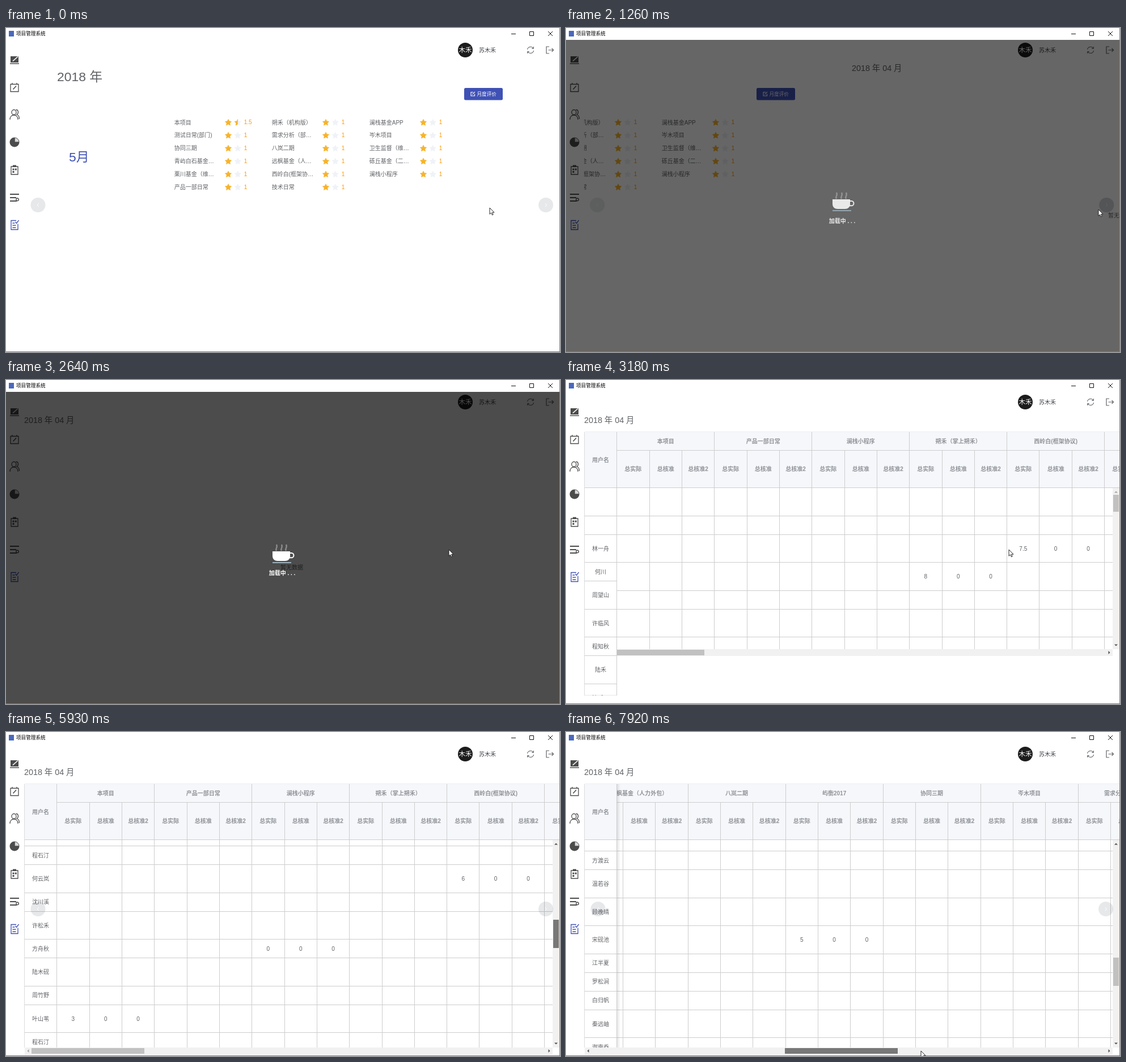
An HTML page with a canvas for the animation above (8000 ms loop, 977x573 px).

```html
<!DOCTYPE html>
<html lang="zh-CN">
<head>
<meta charset="utf-8">
<title>项目管理系统</title>
<style>
html, body { margin: 0; width: 100%; height: 100%; overflow: hidden; background: #fff; }
canvas { display: block; }
</style>
</head>
<body>
<canvas id="stage" width="977" height="573"></canvas>
<script>
const ctx = document.getElementById('stage').getContext('2d');
const FONT = '"Liberation Sans", "Noto Sans CJK SC", "Noto Sans CJK", sans-serif';
const LOOP = 8000, BASE = 10.03;
const BLUE = '#3f51b5', INK = '#606266', DIM = '#909399', ICON = '#4c4c4c', GOLD = '#f7b32a', SCORE = '#ff9900', LINE = '#cdcdcd';

// Screen updates come in bursts: [first, last, count]
const updates = [0].concat([
  [70, 460, 6], [680, 770, 2], [1010, 1260, 4], [1340, 1800, 7], [2180, 2410, 4], [2580, 2640, 2],
  [3180, 3250, 2], [3720, 3950, 4], [4190, 4190, 1], [4430, 4510, 2], [4810, 5150, 5], [5300, 5450, 2],
  [5680, 5930, 4], [6080, 6080, 1], [6230, 6610, 6], [6910, 7680, 11], [7770, 7920, 3]
].flatMap(([a, b, n]) => Array.from({ length: n }, (_, i) => n > 1 ? a + (b - a) * i / (n - 1) : a)));

// Tracks: [time, value, ...]
const pointer = [
  [0, 853, 318], [460, 967, 313], [680, 960, 312], [770, 953, 311], [1010, 953, 311], [1260, 939, 321],
  [1800, 839, 334], [2100, 839, 334], [2410, 776, 312], [2640, 781, 300], [3640, 781, 300], [3950, 688, 324],
  [4350, 688, 324], [4510, 968, 215], [4810, 980, 215], [6310, 980, 430], [6610, 214, 565], [6850, 214, 565],
  [7680, 556, 565], [7920, 626, 564]
];
const scrollDown = [[4740, 0], [5150, 16], [5300, 90], [6080, 1150], [6310, 1432]];
const scrollRight = [[7690, 0], [7770, 1099], [7920, 1594.5]];
const arrowAlpha = [[1230, 1], [1460, 0], [4100, 0], [4250, 1]];

function track(keys, t) {
  const i = keys.findIndex(k => k[0] > t);
  if (i < 0) return keys[keys.length - 1].slice(1);
  if (i === 0) return keys[0].slice(1);
  const a = keys[i - 1], b = keys[i], p = (t - a[0]) / (b[0] - a[0]);
  return a.slice(1).map((v, j) => v + (b[j + 1] - v) * p);
}
const ramp = (t, a, b) => Math.min(1, Math.max(0, (t - a) / (b - a)));
const easeInOut = p => p < .5 ? 2 * p * p : 1 - 2 * (1 - p) * (1 - p);

// Drawing helpers
function rect(x, y, w, h, color) { ctx.fillStyle = color; ctx.fillRect(x, y, w, h); }
function disc(x, y, r, color) { ctx.fillStyle = color; ctx.beginPath(); ctx.arc(x, y, r, 0, 7); ctx.fill(); }
function text(s, x, y, color = INK, size = BASE, align = 'left', weight = 400) {
  ctx.font = `${weight} ${size}px ${FONT}`;
  ctx.textAlign = align;
  ctx.fillStyle = color;
  ctx.fillText(s, x, Math.round(y + size * .35));
}
function shape(d, x, y, fill, stroke, width = 1) {
  const path = new Path2D(d);
  ctx.save();
  ctx.translate(x, y);
  if (fill) { ctx.fillStyle = fill; ctx.fill(path); }
  if (stroke) { ctx.strokeStyle = stroke; ctx.lineWidth = width; ctx.stroke(path); }
  ctx.restore();
}
function clipped(x, y, w, h, draw) {
  ctx.save();
  ctx.beginPath();
  ctx.rect(x, y, w, h);
  ctx.clip();
  draw();
  ctx.restore();
}

const starPath = 'M' + Array.from({ length: 10 }, (_, i) => {
  const r = i % 2 ? 3 : 6, a = i * Math.PI / 5;
  return (r * Math.sin(a)).toFixed(2) + ' ' + (-r * Math.cos(a)).toFixed(2);
}).join('L') + 'Z';
const star = (x, y, color) => shape(starPath, x, y + .3, color, color, .6);
const PEN = 'M-2.5 2.5L3 -3.5';

function windowFrame() {
  rect(0, 0, 977, 21, '#fff');
  rect(5, 5, 9, 10, '#4a69bd');
  text('项目管理系统', 18, 10, '#000', 8.6);
  shape('M891 10.5h8M923.5 6.5h7v7h-7zM956 6l8 8M964 6l-8 8', 0, 0, null, '#111');
  rect(976, 0, 1, 573, '#5d92b8');
  rect(0, 572, 977, 1, '#4589b5');
}

function sidebar() {
  const x = 15;
  shape('M-7 -6h14v11h-14zM-8 6.2h16v1.6h-16z', x, 56, ICON);
  shape('M-3 2.5L6 -5.5', x, 56, null, '#fff', 1.6);
  shape('M-7 -5.5h14v13h-14zM-4 -8v3M4 -8v3', x, 105, null, ICON, 1.3);
  shape(PEN, x, 106, null, ICON, 1.6);
  shape('M-5 -4a4 4.5 0 1 0 8 0a4 4.5 0 1 0 -8 0M-8 9c0 -5 3 -8 7 -8s7 3 7 8M2.5 -8.5c5 0 5 7 1.5 8.5c3 1 4.5 4 4.5 8', x, 153, null, ICON, 1.3);
  disc(x, 202, 8.5, ICON);
  shape('M.8 -.8V-7.4A6.8 6.8 0 0 1 7.4 -.8z', x, 202, '#d8d8d8');
  shape('M-6 -6h12v14h-12z', x, 251, null, ICON, 1.3);
  shape('M-3 -8.5h6v3.5h-6zM-3.5 -2.5h3v3h-3zM.8 -2.5h3v3h-3zM-3.5 2h3v3h-3z', x, 251, ICON);
  shape('M-8 -6H8M-8 0H3M-8 6H4', x, 300, null, ICON, 2);
  shape('M2.8 3.3a2.3 2.3 0 1 0 4.6 0a2.3 2.3 0 1 0 -4.6 0', x, 300, null, ICON, 1.4);
  shape('M3 -7.5h-9v16h12v-10M-3.5 -3h4M-3.5 1h6M-3.5 5h6M1.5 -5l2 2.5L7.5 -8', x, 348, null, BLUE, 1.3);
}

function header() {
  disc(810, 39, 13, '#1c1c1c');
  text('木禾', 810, 39, '#fff', 11.5, 'center');
  text('苏木禾', 834, 39, '#404246');
  shape('M-5.5 -1a5.6 5.6 0 0 1 10.3 -2M5.5 1a5.6 5.6 0 0 1 -10.3 2M5.3 -6v3.3h-3.3M-5.3 6v-3.3h3.3', 925, 39, null, INK, 1.1);
  shape('M-1 -6h-5v12h5M-2.5 0h9M3.5 -3l3 3l-3 3', 959, 39, null, INK, 1.2);
}

const projects = [
  ['本项目', '测试日常(部门)', '协同三期', '青屿白石基金…', '栗川基金（维…', '产品一部日常'],
  ['朔禾（机构版）', '需求分析（部…', '八岚二期', '远枫基金（人…', '西岭白(框架协…', '技术日常'],
  ['澜栈基金APP', '岑木项目', '卫生监督（维…', '砾丘基金（二…', '澜栈小程序']
];

function reviewPage() {
  text('2018 年', 90, 86, INK, 22.9);
  text('5月', 111, 228, BLUE, 22.9);
  ctx.fillStyle = BLUE;
  ctx.beginPath();
  ctx.roundRect(808, 106, 68, 21.5, 2.5);
  ctx.fill();
  shape('M1 -3h-4v6.5h6.5v-3.5M-.5 .8L4 -3.6', 823, 116.5, null, '#fff', 1.1);
  text('月度评价', 830.5, 116.5, '#fff', 8.6, 'left', 500);
  projects.forEach((names, c) => names.forEach((name, r) => {
    const x = 296.7 + c * 172, y = 167 + r * 22.9, half = !c && !r;
    text(name, x, y);
    star(x + 95.3, y, GOLD);
    star(x + 112, y, '#eff2f7');
    if (half) clipped(x + 104, y - 8, 8, 16, () => star(x + 112, y, GOLD));
    text(half ? '1.5' : '1', x + 123, y - .5, SCORE);
  }));
}

// Table data; row heights are in units of 16.5 px
const UNIT = 16.5, COL = 57.33, LEFT = 89.7, TOP = 190.9;
const groups = ['本项目', '产品一部日常', '澜栈小程序', '朔禾（掌上朔禾）', '西岭白(框架协议)', '测试日常(部门)',
  '卫生监督（维护）', '砾丘基金（二期）', '栗川基金（维护）', '远枫基金（人力外包）', '八岚二期', '屿衡2017', '协同三期',
  '岑木项目', '需求分析（部门）', '技术日常'];
const heights = '32332333' + '222' + '23'.repeat(12) + '233322232' + '32'.repeat(8);
const firstNames = '林一舟 何川 周望山 许临风 程知秋 陆禾 沈听雨 叶含章'.split(' ');
const laterNames = '方渡云 温若谷 顾晚晴 宋砚池 江半夏 罗松涧 白归帆 秦远岫 谢南乔'.split(' ');
const hours = { 2: [[4, 7.5]], 3: [[3, 8]], 7: [[4, 13]], 38: [[1, 7], [11, 5]], 42: [[1, 0], [2, 23]] };
const inventName = i => '何周许程陆沈叶方'[i * 5 % 8] + '云舟山川木石松竹'[i * 3 % 8] + '禾溪岚汀苇野砚秋'[(i * 7 + 2) % 8];
let rowTop = 0;
const rows = [...heights].map((u, i) => {
  const h = u * UNIT, y = rowTop;
  rowTop += h;
  const filler = i > 35 && i < 44 ? [[1, 0]] : i > 7 && i < 34 && i % 3 === 0 ? [[i % 5, i % 9]] : [];
  return { y, h, name: firstNames[i] || laterNames[i - 35] || inventName(i), cells: hours[i] || filler };
});

function tableHeader(sx) {
  rect(33, 92, 943, 99, '#f5f7fa');
  rect(33, 91, 943, 1, '#ebeef5');
  clipped(90, 92, 886, 99, () => {
    groups.forEach((name, g) => {
      const x = LEFT + g * 3 * COL - sx;
      text(name, x + 1.5 * COL, 108, DIM, BASE, 'center', 700);
      ['总实际', '总核准', '总核准2'].forEach((label, k) => {
        text(label, x + (k + .5) * COL, 157.5, DIM, BASE, 'center', 700);
        rect(Math.floor(x + k * COL), k ? 125 : 92, 1, k ? 66 : 99, LINE);
      });
    });
    rect(90, 124, 886, 1, LINE);
  });
  text('用户名', 61, 141, DIM, BASE, 'center', 700);
  rect(33, 190, 943, 1, LINE);
}

function tableBody(sx, sy, bottom) {
  clipped(90, 191, 874, bottom - 191, () => {
    for (let k = 0; k < 48; k++) rect(Math.floor(LEFT + k * COL - sx), 191, 1, 367, LINE);
    for (const row of rows) {
      const y = TOP + row.y - sy;
      rect(90, Math.floor(y + row.h), 874, 1, LINE);
      for (const [g, v] of row.cells)
        [v, 0, 0].forEach((n, k) => text(n, LEFT + (g * 3 + k + .5) * COL - sx, y + row.h / 2, INK, BASE, 'center'));
    }
  });
}

function nameColumn(sx, sy, lag) {
  clipped(33, 191, 57, 367, () => {
    rect(33, 191, 57, 367, '#fff');
    if (lag) { rect(33, 240, 57, 1, LINE); rect(33, 273, 57, 1, LINE); rect(33, 557, 57, 1, '#e4e7ed'); }
    for (const row of rows) {
      const y = TOP + row.y - sy + lag;
      text(row.name, 61, y + row.h / 2, INK, BASE, 'center');
      rect(33, Math.floor(y + row.h), 57, 1, LINE);
    }
  });
  rect(32, 92, 1, 466, '#dcdcdc');
  rect(89, 92, 1, 466, LINE);
  if (sx > 0) {
    const shade = ctx.createLinearGradient(90, 0, 96, 0);
    shade.addColorStop(0, 'rgba(0,0,0,.1)');
    shade.addColorStop(1, 'rgba(0,0,0,0)');
    rect(90, 92, 6, 466, shade);
  }
}

function scrollbars(sx, sy, bottom, t) {
  const ON = '#505050', OFF = '#a3a3a3', settled = bottom > 500;
  rect(964, 191, 12, bottom - 191, '#f1f1f1');
  rect(33, bottom, 931, 12, '#f1f1f1');
  const vColor = t >= 4810 && t < 6380 ? '#787878' : t >= 4510 && t < 4810 ? '#a8a8a8' : '#c1c1c1';
  rect(965, Math.round(202.7 + sy * .137), 10, settled ? 50 : 30, vColor);
  rect(45 + sx / 4.676, bottom + 1, 199, 10, t >= 6910 ? '#787878' : '#c1c1c1');
  shape('M-3 1.5h6l-3 -3z', 970, 198, sy > 0 ? ON : OFF);
  shape('M-3 -1.5h6l-3 3z', 970, bottom - 7, ON);
  shape('M1.5 -3v6l-3 -3z', 39, bottom + 6, sx > 0 ? ON : OFF);
  shape('M-1.5 -3v6l3 -3z', 958, bottom + 6, ON);
}

function table(t) {
  const [sx] = track(scrollRight, t), [sy] = track(scrollDown, t);
  const settled = t >= 3250, bottom = settled ? 558 : 476;
  tableHeader(sx);
  tableBody(sx, sy, bottom);
  scrollbars(sx, sy, bottom, t);
  nameColumn(sx, sy, settled ? 0 : 82.5);
  rect(33, 570, 943, 1, '#ebeef5');
}

function carouselArrows(t) {
  const [alpha] = track(arrowAlpha, t), out = 10 * (1 - alpha);
  if (!alpha) return;
  ctx.save();
  ctx.globalAlpha = alpha;
  [[56.5 - out, -1], [952 + out, 1]].forEach(([x, dir]) => {
    const hover = dir > 0 && t >= 770 && t < 1460;
    disc(x, 313, 13, `rgba(31,45,61,${hover ? .23 : .11})`);
    shape(`M${-1.3 * dir} -3L${1.5 * dir} 0L${-1.3 * dir} 3`, x, 313, null, '#fff', 1);
  });
  ctx.restore();
}

function loading(alpha) {
  ctx.save();
  ctx.globalAlpha = alpha;
  rect(0, 21, 976, 551, 'rgba(0,0,0,.7)');
  for (const x of [477, 486, 494])
    shape('M0 0c-3 -4 3 -5 0 -11', x, 302, null, 'rgba(255,255,255,.35)', 2.4);
  shape('M470 303h31v8c0 6 -4 9 -9 9h-13c-5 0 -9 -3 -9 -9z', 0, 0, '#fff');
  shape('M500 306h3.5a3.8 4 0 0 1 0 8.3h-4', 0, 0, null, '#fff', 2);
  rect(470, 322, 33, 2, '#9ab0bc');
  text('加载中 . . .', 487, 341, '#fff', BASE, 'center', 700);
  ctx.restore();
}

function draw(now) {
  const time = now % LOOP;
  const t = updates.filter(u => u <= time).pop();
  rect(0, 0, 977, 573, '#fff');
  sidebar();
  header();
  clipped(32, 55, 944, 517, () => {
    const shift = 944 * easeInOut(ramp(t, 1060, 1460));
    ctx.save();
    ctx.translate(-shift, 0);
    if (shift < 944) reviewPage();
    ctx.translate(944, 0);
    text('2018 年 04 月', 32, 71, INK, 14.33);
    if (t < 3180) text('暂无数据', 504, 331, INK, BASE, 'center');
    ctx.restore();
    if (t >= 3180) table(t);
    carouselArrows(t);
  });
  if (t >= 1010 && t < 3180) loading(ramp(t, 970, 1310));
  windowFrame();
  const [x, y] = track(pointer, t);
  shape('M0 0V11.3L2.6 8.9L4.4 12.8L6.2 12L4.5 8.2H8Z', x, y, '#fff', '#111', .9);
}

const start = performance.now();
(function tick() {
  draw(performance.now() - start);
  requestAnimationFrame(tick);
})();
</script>
</body>
</html>
```
